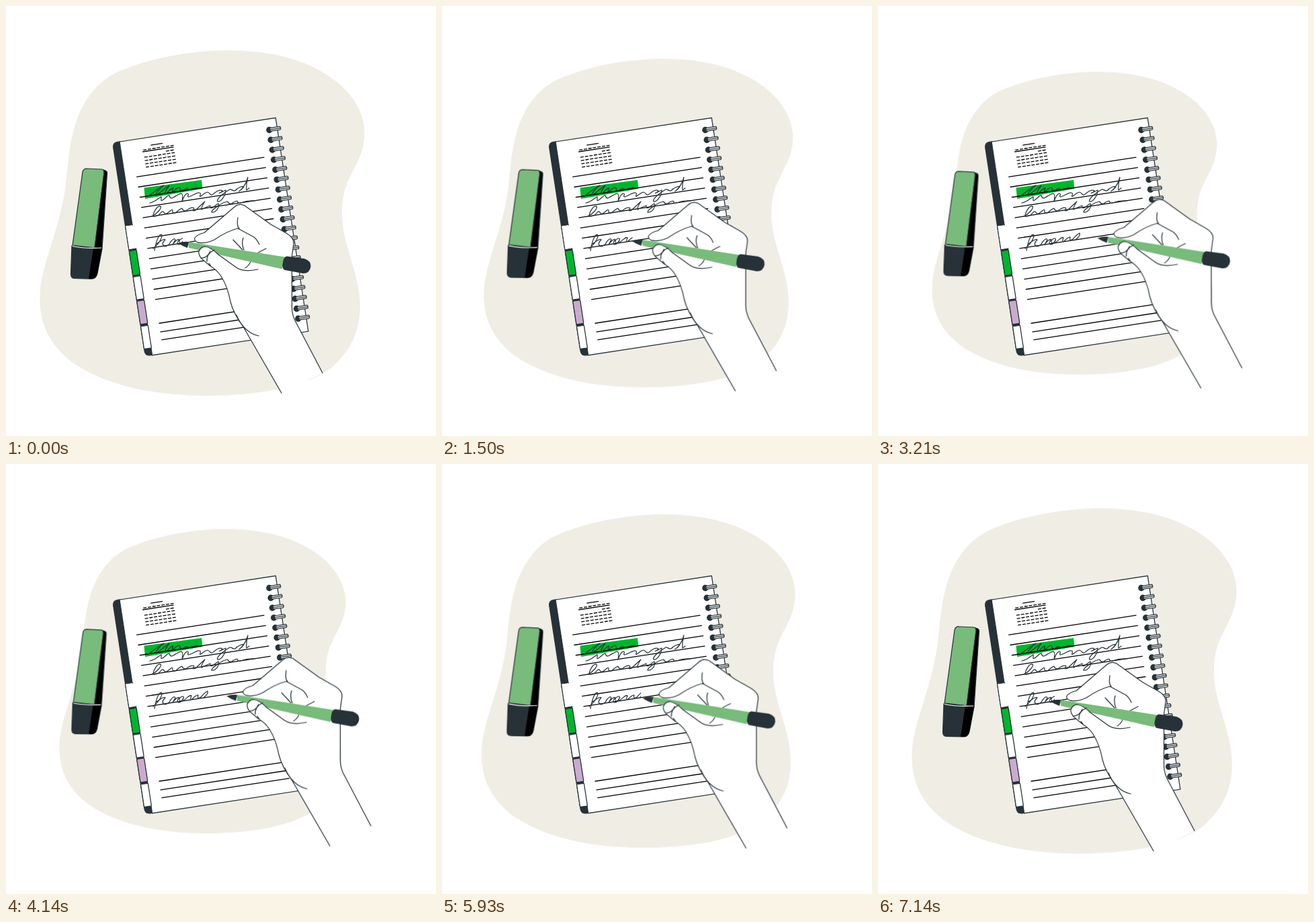
An HTML page for the animation above (7.21 s loop, 640x640 px).

```html
<!DOCTYPE html>
<html lang="en">
<head>
<meta charset="utf-8">
<title>Writing in a notebook</title>
<style>
html, body { margin: 0; width: 100%; height: 100%; overflow: hidden; background: #fff; }
svg { display: block; width: 100vw; height: 100vh; }

.ink { fill: none; stroke: #263238; stroke-width: 1.25; stroke-linecap: round; stroke-linejoin: round; }
.dark { fill: #263238; }
.edge { stroke: #263238; stroke-width: 1.25; stroke-linejoin: round; }
.rule { fill: none; stroke: #000; stroke-width: 1.3; }
.dash { stroke-dasharray: 5 1.8; }

.blob, .marker { animation: breathe 7.21s infinite; }
.blob { --small: .874; transform-origin: 296px 325px; }
.marker { --small: .947; transform-origin: 124px 324px; }
.hand, .reveal { animation: write 7.21s linear infinite; }
.hand { --k: 1; }
.reveal { --k: .78; }

@keyframes breathe {
  0% { transform: scale(1); animation-timing-function: cubic-bezier(.35, 0, .64, 1); }
  49.5% { transform: scale(var(--small)); animation-timing-function: cubic-bezier(.37, 0, .63, 1); }
  100% { transform: scale(1); }
}
@keyframes write {
  0% { transform: translate(0, 0); }
  11.93% { transform: translate(calc(var(--k) * 7px), calc(var(--k) * -6.5px)); }
  21.5% { transform: translate(calc(var(--k) * 28px), calc(var(--k) * -3px)); }
  28.71% { transform: translate(calc(var(--k) * 49px), calc(var(--k) * -8px)); }
  35.5% { transform: translate(calc(var(--k) * 61px), calc(var(--k) * -4.5px)); }
  44.52% { transform: translate(calc(var(--k) * 70.5px), calc(var(--k) * -7.5px)); }
  52% { transform: translate(calc(var(--k) * 72px), calc(var(--k) * -7.5px)); }
  76.3% { transform: translate(calc(var(--k) * 72.2px), calc(var(--k) * -7.5px)); animation-timing-function: ease; }
  100% { transform: translate(0, 0); }
}
</style>
</head>
<body>
<svg viewBox="0 0 640 640">
  <defs>
    <clipPath id="written"><rect class="reveal" x="100" y="250" width="163" height="200"/></clipPath>
    <g id="ring">
      <circle r="4.7" class="dark"/>
      <rect x="1" y="-2.7" width="16" height="4.8" rx="1.6" fill="#fff" class="edge"/>
      <path class="ink" d="M1,-.3H16.5"/>
    </g>
  </defs>

  <path class="blob" fill="#efede4" d="M182,92C225,75 285,66 330,66C400,66 455,82 495,115C525,141 537,172 533,200C528,240 500,255 500,307C500,345 514,372 523,412C534,465 522,505 485,538C445,568 375,580 295,580C220,579 150,566 98,530C60,500 47,465 51,420C57,375 82,325 89,265C94,215 97,165 130,126C145,108 163,98 182,92Z"/>

  <g class="marker">
    <path class="edge" fill="#78bb7b" d="M120,242L143,243Q147,244 146,248L132,360L99,356L114,247Q115,242 120,242Z"/>
    <path class="edge" d="M145,244Q151,245 150.5,249L143,361L132,360L146,248Z"/>
    <path class="dark edge" d="M98,357L143,361L136,398Q134,406 127,406L102,405.5Q96,405 96.5,398Z"/>
    <path d="M130,360L143,361L136,398Q134,406 128,406L123,406Z"/>
    <path d="M99,357.5Q118,361.5 142,360" fill="none" stroke="#fff" stroke-width="1.2"/>
  </g>

  <g transform="translate(169 202) rotate(-8.7)">
    <path class="dark edge" d="M1,0H-3Q-10.5,0 -10.5,8V313Q-10.5,321 -3,321H1Z"/>
    <path class="edge" fill="#fff" d="M0,0H235V321.5H0Z"/>
    <g class="edge" id="tabs"></g>
    <path fill="#fff" d="M-9.8,126H3V160H-9.8Z"/>
  </g>
  <path fill="#00b52d" d="M205.5,270.5L291,259L292.5,272L207,287Z"/>
  <g transform="translate(169 202) rotate(-8.7)">
    <path class="rule" id="rules"/>
    <path class="rule" d="M45,12H63M31.5,20H78.5"/>
    <path class="rule dash" d="M33,17.5H79M66,24.3H79M33,28.4H79M33,33.4H79M33,38.4H79M33,43.4H79"/>
    <g id="rings"></g>
  </g>

  <path class="ink" d="M212,283C218,279 230,268 235,267C228,271 220,283 224,281C232,276 240,268 243,267C239,272 234,281 238,279C244,274 247,270 249,271C247,274 246,277 250,275C254,271 258,269 259,271C259,274 260,276 264,274C268,271 270,271 272,273Q276,272 285,270"/>
  <path class="ink" d="M214,293C222,292 228,285 231,284C232,287 229,291 233,289C239,285 241,281 243,282C244,285 245,287 249,285C254,282 258,279 261,279Q264,280 262,291Q266,279 270,279C274,280 268,284 272,284C279,282 284,277 288,278C292,279 286,285 290,283Q297,277 300,277C304,278 303,282 307,281C312,277 318,272 322,275C319,279 315,279 319,278Q325,275 327,274C327,282 320,292 315,291C312,288 324,278 333,273C336,272 337,276 341,275C345,270 352,268 354,269C350,275 344,277 348,275C354,270 358,262 360,255Q357,268 358,274L362,271"/>
  <path class="ink" d="M217,313C226,309 232,300 230,298C224,297 219,309 219,313Q226,314 231,307C236,303 234,311 239,309C247,304 246,302 248,304Q247,309 252,308Q260,301 262,301Q263,305 268,305C274,300 277,299 280,301Q276,307 282,304L296,291Q290,300 291,303Q298,299 304,297Q303,302 308,300Q314,295 316,294C318,302 311,308 306,307C306,303 322,292 330,291Q331,295 336,294Q343,289 345,291Q344,294 349,293Q360,289 370,290"/>
  <g clip-path="url(#written)">
    <path class="ink" d="M219,361C229,353 234,342 231,340C226,340 222,357 221,364M224,354Q236,345 237,348Q230,354 236,358Q243,357 245,351Q251,344 252,348L248,355Q256,345 258,348C253,352 255,357 260,354C265,349 266,345 262,346C256,349 256,355 264,352C271,347 274,343 276,345Q273,352 277,350Q284,343 286,344Q284,351 290,347Q296,340 300,338C302,342 296,346 294,348"/>
  </g>

  <g class="hand">
    <path fill="#fff" d="M280.5,346Q285,340 295,337.5L340,299Q347,293 355,297L394,325L417,338Q429,345 428,354L425.5,372L425.5,445Q425,458 430,468L471,546L410,576L354,479Q338,457 334,440Q330,418 320,402Q314,393 304,387L288,374Q285,360 294,352Q281,354 280.5,346Z"/>
    <path class="ink" d="M471,546L430,468Q425,458 425.5,445L425.5,372L428,354Q429,345 417,338L394,325L355,297Q347,293 340,299L295,337.5Q284,340 280.5,346C281,355 297,354 310,348Q329,335 345,331L369,344Q374,348 377,355M345,315Q343,328 347,331M338,348L352,363M353,345Q350,354 354,363M387,361Q372,368 366,374Q364,385 356,390"/>
    <path fill="#78bb7b" d="M271,351L415,373.5L411,391.5L272,360Z"/>
    <path class="dark" d="M256,353Q264,350 272,351L270,360Q262,357 256,353ZM418,372.5L444,376Q454,379 453.5,388Q452,398 442,398L415,393Q410,391 412,382Q413,373 418,372.5Z"/>
    <path fill="#fff" d="M288,374Q284,360 296,358Q305,359 314,368L322,374L330,402L304,388Z"/>
    <path class="ink" d="M410,576L354,479Q338,457 334,440Q330,418 320,402Q314,393 304,387L292,377Q286,371 287,365Q290,358 296,358Q305,359 316,370L341,388Q352,397 375,392M290,375Q299,376 304,365M299,380Q298,369 310,363M302,383L305,387M343,460Q354,486 376,491"/>
  </g>
</svg>
<script>
const fill = (id, items, html) => {
  document.getElementById(id).innerHTML = items.map(html).join('');
};

fill('tabs', [
  [125, 36, '#fff'],
  [163, 37, '#00b52d'],
  [202, 34.5, '#fff'],
  [238.5, 35, '#cbaacf'],
  [276.5, 34, '#fff']
], ([y, height, color]) =>
  `<rect x="-10.5" y="${y}" width="11" height="${height}" rx="1" fill="${color}"/>`);

fill('rings', Array.from({ length: 20 }, (_, i) => 16.4 + 14.95 * i),
  y => `<use href="#ring" x="223" y="${y}"/>`);

const ruleHeights = [...Array.from({ length: 13 }, (_, i) => 55.5 + 15.4 * i), 276, 289, 301];
document.getElementById('rules').setAttribute('d', ruleHeights.map(y => `M17,${y}H209.5`).join(''));
</script>
</body>
</html>
```
